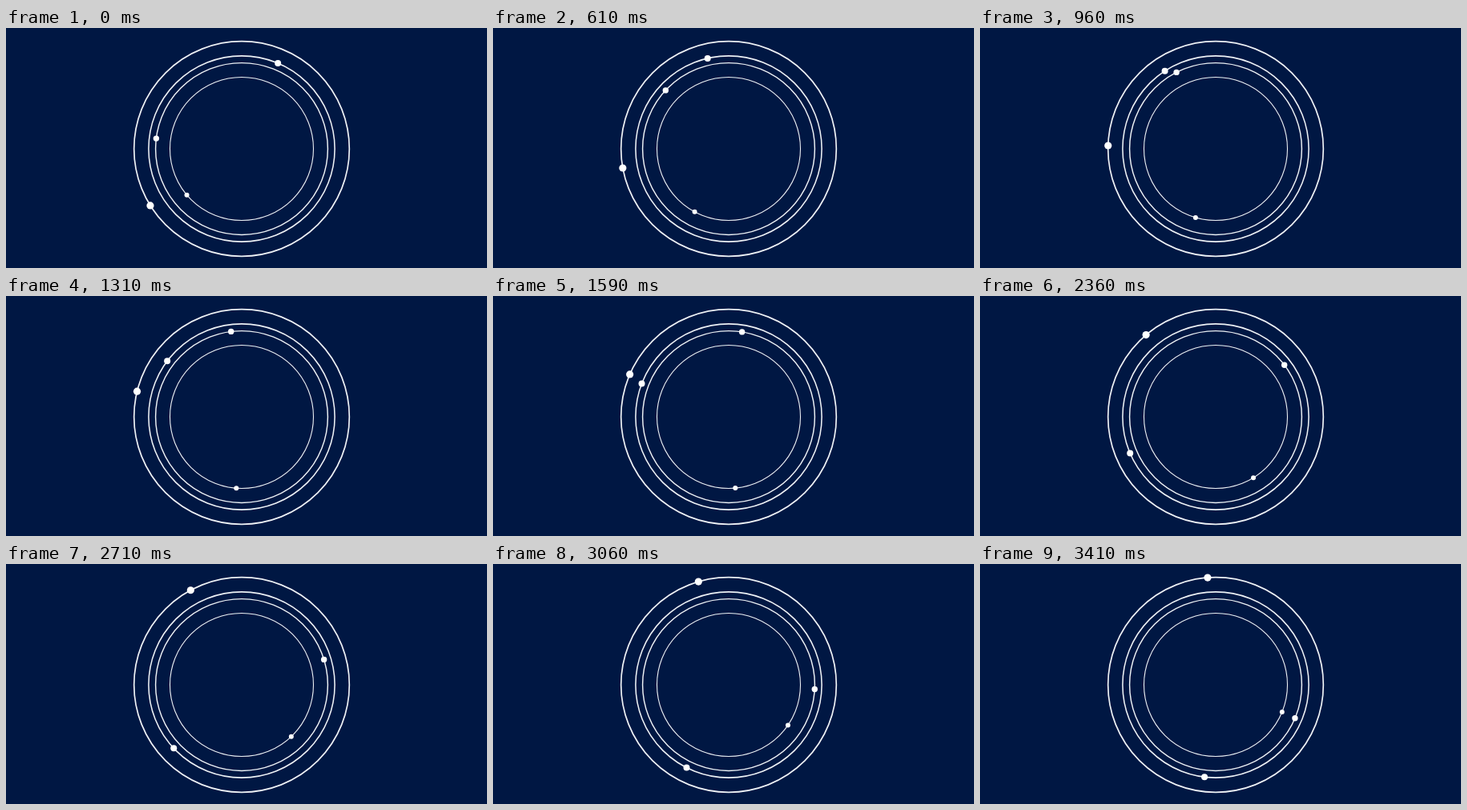
Animation of 600 by 300 pixels, one loop 3.48 s. Source, as an HTML page with a canvas:

```html
<!DOCTYPE html>
<html lang="en">
<head>
<meta charset="utf-8">
<title>Orbits</title>
<style>
  html, body { margin: 0; width: 100%; height: 100%; overflow: hidden; background: #001743; }
  canvas { display: block; }
</style>
</head>
<body>
<canvas id="stage" width="600" height="300"></canvas>
<script>
const ctx = document.getElementById('stage').getContext('2d');
const LOOP = 3480, CX = 294, CY = 151;

// start and step are in degrees, clockwise from the right
const orbits = [
  { r: 134.3, line: 1.7, dot: 4.6, start: 148.1, step: 2.4 },
  { r: 116.1, line: 1.55, dot: 4, start: -67.1, step: -4 },
  { r: 107.4, line: 1.45, dot: 3.7, start: 186.9, step: 4 },
  { r: 89.5, line: 1.1, dot: 3, start: 139.9, step: -2.4 }
];

// The motion advances in 50 ticks; the early ones are slightly shorter.
function tickAt(t) {
  if (t < 70) return 0;
  if (t < 530) return 1 + Math.floor((t - 70) * 7 / 460);
  if (t < 610) return 8;
  return 9 + Math.floor((t - 610) / 70);
}

function circle(x, y, r) {
  ctx.beginPath();
  ctx.arc(x, y, r, 0, Math.PI * 2);
}

function draw(now) {
  const tick = tickAt(now % LOOP);
  ctx.fillStyle = '#001743';
  ctx.fillRect(0, 0, 600, 300);
  ctx.strokeStyle = '#eef1f5';
  ctx.fillStyle = '#fff';
  for (const o of orbits) {
    ctx.lineWidth = o.line;
    circle(CX, CY, o.r);
    ctx.stroke();
    const a = (o.start + o.step * tick) * Math.PI / 180;
    circle(CX + o.r * Math.cos(a), CY + o.r * Math.sin(a), o.dot);
    ctx.fill();
  }
}

const begin = performance.now();
function loop() {
  draw(performance.now() - begin);
  requestAnimationFrame(loop);
}
loop();
</script>
</body>
</html>
```
